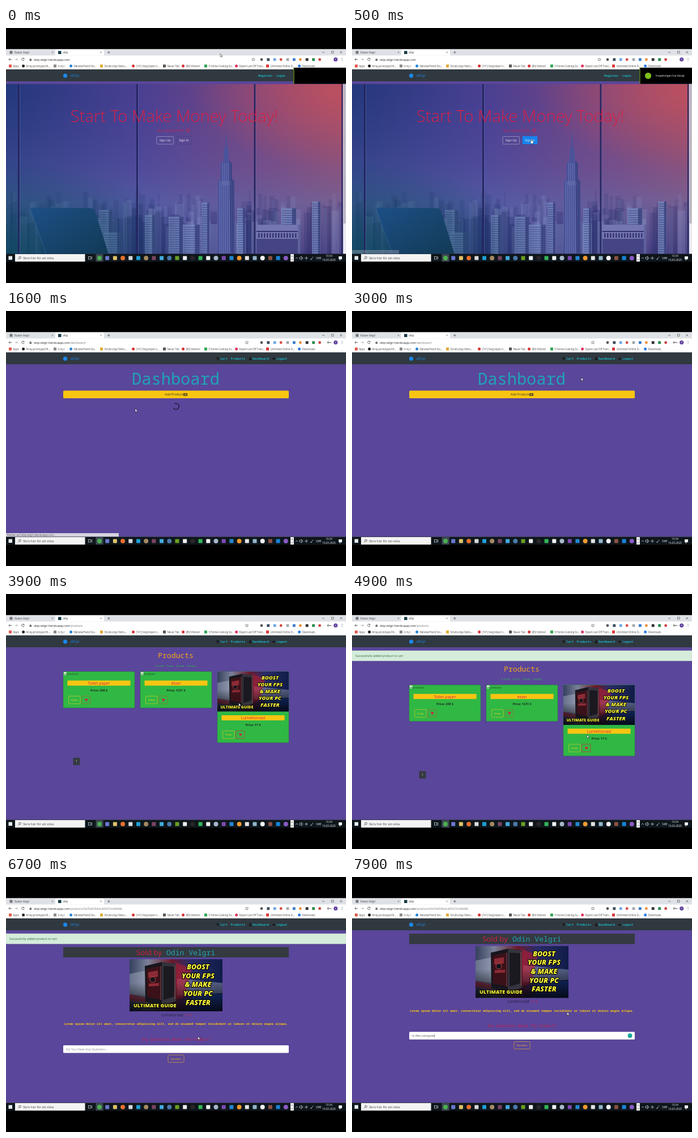
An HTML page that plays this animation: 600x450 px, repeating every 8000 ms.

```html
<!DOCTYPE html>
<html lang="sv">
<head>
<meta charset="utf-8">
<style>
html, body { margin: 0; width: 100%; height: 100%; overflow: hidden; background: #000; }
svg { display: block; width: 600px; height: 450px; font-family: "Open Sans", sans-serif; }
.mono { font-family: "Noto Sans Mono", monospace; }
.nav { font-family: "DejaVu Sans Mono", monospace; font-size: 5.35px; font-weight: bold; fill: #18b3c4; }
.mid { text-anchor: middle; }
</style>
</head>
<body>
<svg id="stage" viewBox="0 0 600 450"></svg>
<script>
const LOOP = 8000, STEP = 100, ALERT_H = 23.6;
const HOST = 'okip-velgri.herokuapp.com';
const PURPLE = '#5a469a', DARK = '#30393f', RED = '#d91f45', GOLD = '#f8c512', TEAL = '#20a4b6', GREEN = '#30b844';

const box = (x, y, w, h, fill, more = '') =>
  `<rect x="${x}" y="${y}" width="${w}" height="${h}" fill="${fill}" ${more}/>`;
const dot = (x, y, r, fill, more = '') => `<circle cx="${x}" cy="${y}" r="${r}" fill="${fill}" ${more}/>`;
const line = (d, stroke, w = 0.8) => `<path d="${d}" fill="none" stroke="${stroke}" stroke-width="${w}"/>`;
const text = (x, y, s, size, fill, more = '') =>
  `<text x="${x}" y="${y}" font-size="${size}" fill="${fill}" ${more}>${s.replace(/&/g, '&amp;')}</text>`;
const mid = (x, y, s, size, fill, more = '') => text(x, y, s, size, fill, 'text-anchor="middle" ' + more);
const group = (id, body) => `<g id="${id}">${body}</g>`;
const outline = (x, y, w, h, color) => box(x, y, w, h, 'none', `rx="1.5" stroke="${color}" stroke-width=".7"`);
const cart = (x, y, fill, k = 1) => `<g transform="translate(${x} ${y}) scale(${k})">
  <path d="M0 0h1.3l.3 1H6.5l-1 3H2.2L1.2.8H0z" fill="${fill}"/>${dot(2.6, 5.2, .7, fill)}${dot(5, 5.2, .7, fill)}</g>`;

let seed = 11;
const rnd = () => (seed = (seed * 16807) % 2147483647) / 2147483647;

const defs = `<defs>
  <linearGradient id="sky"><stop offset="0" stop-color="#23387c"/><stop offset=".4" stop-color="#4a3f92"/>
    <stop offset=".72" stop-color="#78457f"/><stop offset="1" stop-color="#a14c66"/></linearGradient>
  <linearGradient id="haze" x2="0" y2="1"><stop offset="0" stop-color="#4a4aa0" stop-opacity="0"/>
    <stop offset=".5" stop-color="#5b62ac" stop-opacity=".35"/><stop offset=".7" stop-color="#5a6cae" stop-opacity=".6"/>
    <stop offset="1" stop-color="#3c4088" stop-opacity=".85"/></linearGradient>
  <radialGradient id="deep" cx="0" cy="1" r=".55"><stop offset="0" stop-color="#0d4a5e" stop-opacity=".9"/>
    <stop offset="1" stop-color="#0d4a5e" stop-opacity="0"/></radialGradient>
  <radialGradient id="glow" cx="1" cy=".05" r=".45"><stop offset="0" stop-color="#c8525c" stop-opacity=".7"/>
    <stop offset="1" stop-color="#c8525c" stop-opacity="0"/></radialGradient>
  <linearGradient id="lid" x2="1" y2="1"><stop offset="0" stop-color="#1d4f86"/><stop offset="1" stop-color="#123a55"/></linearGradient>
  <linearGradient id="room"><stop offset="0" stop-color="#35405e"/><stop offset=".2" stop-color="#7a8198"/>
    <stop offset=".45" stop-color="#6b1a2c"/><stop offset=".65" stop-color="#2a2c66"/><stop offset="1" stop-color="#101c48"/></linearGradient>
  <linearGradient id="floor" x2="0" y2="1"><stop offset=".45" stop-color="#000" stop-opacity="0"/><stop offset="1" stop-color="#05060e" stop-opacity=".9"/></linearGradient>
  <clipPath id="view"><rect y="99" width="595" height="299.5"/></clipPath>
  <clipPath id="card"><rect width="164" height="92"/></clipPath>
</defs>`;

function city() {
  let s = '';
  for (let i = 0; i < 190; i++) {
    const near = i / 190, w = 3 + near * 9 + rnd() * 5, x = rnd() * 600, y = 283 + near * 62 + rnd() * 24 - rnd() * 20 * near;
    s += box(x.toFixed(1), y.toFixed(1), w.toFixed(1), 120, rnd() < .4 ? '#8f9fd0' : '#1d2460', `opacity="${(.1 + near * .2).toFixed(2)}"`);
  }
  const tower = (x, y, w) => {
    let t = box(x, y, w, 400 - y, '#7587bd', 'opacity=".72"') + box(x + w * .72, y, w * .28, 400 - y, '#272d6b', 'opacity=".6"');
    for (let r = y + 4; r < 398; r += 4) t += box(x + 1, r, w - 2, 1.2, '#2b3575', 'opacity=".55"');
    return t;
  };
  [[164, 321, 24], [173, 361, 32], [245, 330, 18], [287, 333, 26], [312, 347, 30], [345, 308, 14], [408, 318, 14], [486, 318, 26], [540, 306, 15]]
    .forEach(b => s += tower(...b));
  s += box(442, 347, 73, 52, '#7475b2') + box(442, 358, 73, 2, '#33336f') + box(442, 372, 73, 27, '#454585');
  for (let x = 445; x < 514; x += 5) s += box(x, 362, 2.5, 8, '#34346f');
  return s;
}

function skyscraper() {
  let s = '<path d="M388.6 185h.8l.7 24 2.3 5 1 20 5.2 5v27l4.4 5v127.5h-29V271l4.4-5v-27l5.2-5 1-20 2.3-5z" fill="#4a539a"/>';
  for (let x = 377; x < 403; x += 3.4) s += box(x, 270, 1, 128, '#8791c4', 'opacity=".6"');
  for (let x = 382; x < 398; x += 3.4) s += box(x, 238, 1, 40, '#8791c4', 'opacity=".5"');
  return s + '<path d="M394 234l4.600 5v27l4.400 5v127h-7z" fill="#252b66" opacity=".45"/>';
}

const post = (x, w) => box(x, 99, w, 300, '#22245f', 'opacity=".9"') + box(x + w, 99, 1, 300, '#7d86c0', 'opacity=".35"');

const photo = `<g clip-path="url(#view)">
  ${['sky', 'haze', 'glow'].map(g => box(0, 99, 595, 300, `url(#${g})`)).join('')}
  ${city()}${skyscraper()}${box(0, 99, 595, 300, 'url(#deep)')}
  ${post(21, 3)}${post(230, 3)}${post(437.500, 3)}${post(592, 2)}
  <path d="M43 321q0-4 5-4l101 1q6 0 8 5l24 76H70z" fill="url(#lid)"/>
  <path d="M43 321l28 78" stroke="#4a87b5" stroke-width=".7" opacity=".6"/></g>`;

const home = box(0, 94, 595, 5, PURPLE) + photo + box(595, 73, 5, 326, '#ece9f0') + box(595.5, 78, 4, 267, '#b9b3c2') +
  mid(297, 166, 'Start To Make Money Today!', 29.3, RED, 'font-weight="300"') +
  text(267, 183, 'Buy, Sell & Profit', 6.1, RED) +
  dot(321.500, 180.600, 2.700, 'none', `stroke="${RED}" stroke-width=".9"`) + line('M320 181.500q1.500 1.500 3 0', RED, .7) +
  outline(266, 191.500, 29.500, 13.500, '#a5a5c6') + mid(280.800, 200.300, 'Sign Up', 5.600, '#eee') +
  outline(301, 191.500, 26, 13.500, '#3d4386') + group('hot', box(300.700, 191, 26.600, 14, '#1685f2', 'rx="1.5"')) +
  mid(314, 200.300, 'Sign In', 5.600, '#eee');

const dash = mid(299.500, 130, 'Dashboard', 28.700, TEAL, 'class="mono"') +
  box(101, 140.500, 398, 13.500, GOLD, 'rx="1.5"') + text(280, 149.300, 'Add Product', 5.600, '#33331f') +
  box(312.800, 145.200, 7.200, 4.200, '#242424', 'rx=".5"') + dot(316.400, 147.300, 1.200, GOLD) +
  box(313.500, 146.300, .8, 2, GOLD) + box(318.400, 146.300, .8, 2, GOLD) +
  group('spin', '<path d="M-2.700 -4.700A5.400 5.400 0 1 1 -4.700 2.700" fill="none" stroke="#1b1530" stroke-width="1.300"/>');

// 164 x 92 advert picture, reused at two sizes
function advert(x, y, k) {
  const words = ['BOOST', 'YOUR FPS', '& MAKE', 'YOUR PC', 'FASTER'];
  const ink = 'font-weight="800" font-style="italic" stroke="#000" stroke-width="2" paint-order="stroke" stroke-linejoin="round"';
  return `<g transform="translate(${x} ${y}) scale(${k})" clip-path="url(#card)">
    ${box(0, 0, 164, 92, 'url(#room)')}
    <path d="M0 26L30 20v45L0 62zM84 34l80 8v18l-80 4z" fill="#c4ccdd" opacity=".35"/>
    <path d="M80 6l30 10-12 50-18 6zM0 62l30 6v9L0 73z" fill="#b51f35" opacity=".6"/>
    <path d="M112 62h52v30h-60z" fill="#1745a5" opacity=".55"/>
    ${box(0, 0, 164, 92, 'url(#floor)')}
    <path d="M27 12L57 5l25 3v66l-25 8-29-7z" fill="#17161d"/>
    <path d="M57 5l25 3v66l-25 8z" fill="#35333d"/><path d="M60 12l19 1v53l-19 6z" fill="#1b1920"/>
    <path d="M30 17l24-5v59l-23-4z" fill="#3b1119"/><path d="M33 23l17-3v11l-17 2zM34 43l18-1v5l-18 1z" fill="#8d2b35"/>
    ${dot(41, 36, 5, '#15131b', 'stroke="#c44b4d"')}${line('M55 12v60M80 11v59', '#a54a50', 1)}
    ${words.map((w, i) => mid(121, 18 + i * 15.700, w, 12.400, '#f6f23a', ink)).join('')}
    ${text(7, 84.500, 'ULTIMATE GUIDE', 9, '#f6f23a', ink.replace('italic', 'normal'))}</g>`;
}

function card(x, name, price, picture) {
  const dy = picture ? 61.300 : 0;
  return box(x, 160.500, 126, 64 + dy, GREEN, 'rx="1.500" stroke="#27813c" stroke-width=".6"') +
    (picture ? advert(x, 160.500, .768)
      : box(x + 1, 161.500, 4.500, 5, '#e8efe8') + box(x + 1.800, 164, 3, 1.800, '#4c9a52') + text(x + 6, 166.700, 'product', 5.600, '#25452c')) +
    box(x + 7.500, 176.300 + dy, 111, 9, GOLD) + mid(x + 63, 183.500 + dy, name, 7.200, RED) +
    mid(x + 63, 195.700 + dy, price, 5.400, '#1d2b20', 'font-weight="700"') +
    outline(x + 9.500, 203.800 + dy, 20.500, 13.500, '#d4c924') + mid(x + 19.700, 212.500 + dy, 'View', 5.400, '#d4c924') +
    outline(x + 32.500, 203.800 + dy, 15.500, 13.500, picture ? RED : '#9d6a38') + cart(x + 37, 207.600 + dy, RED);
}

// Pages that slide with the alerts are laid out for none showing.
const shop = `<g transform="translate(0 ${-ALERT_H})">` + mid(299.500, 137, 'Products', 13.100, '#f3a51e', 'class="mono"') +
  mid(300, 152.200, 'Find Your Item Today', 6, '#2fae55', 'class="mono"') +
  card(101, 'Toilet paper', 'Price: 200 $') + card(237, 'eban', 'Price: 1231 $') + card(373, 'LumeKorvad', 'Price: 17 $', true) +
  box(118.500, 312.500, 12, 13, '#343a40', 'rx="1"') + mid(124.500, 321, '1', 5.400, '#ddd') + '</g>';

const item = box(101, 100, 398, 18.300, '#343a40') + text(230, 114, 'Sold by', 13.300, RED) +
  text(283, 114, 'Odin Velgri', 13.100, TEAL, 'class="mono"') + advert(218, 121.500, 1) +
  text(274, 222, 'LumeKorvad', 6.500, '#272142') + text(315, 222, '17 $', 6, RED) +
  mid(300, 237.600, 'Lorem ipsum dolor sit amet, consectetur adipiscing elit, sed do eiusmod tempor incididunt ut labore et dolore magna aliqua.',
    5.360, GOLD, 'class="mono" font-weight="700"') +
  mid(300, 265, 'Any Questions About The Product?', 6.300, '#c02350', 'class="mono"') +
  box(101, 273.300, 398, 13.500, '#fff', 'rx="1.500"') + '<text id="typed" x="106" y="282.300" font-size="5.500"/>' +
  group('caret', box(0, 277, .5, 6, '#333')) + group('helper', dot(490.500, 280, 3.900, '#18a79c')) +
  outline(286, 290.500, 28, 13, '#d8a72b') + mid(300, 299, 'Senden', 5.500, '#d8a72b');

const navbar = box(0, 73, 600, 21, DARK) + dot(104.500, 84.200, 3.600, '#1d87ec') +
  text(113, 86.300, 'oKip', 6.600, '#1d87ec', 'class="mono" font-style="italic"') +
  group('guest', '<text class="nav" x="445" y="86">Register</text><text class="nav" x="477" y="86">Login</text>') +
  group('member', cart(370.500, 81.500, '#14181b', .85) +
    [['Cart', 378], ['Products', 396.500], ['Dashboard', 435], ['Logout', 477]].map(([s, x]) => `<text class="nav" x="${x}" y="86">${s}</text>`).join('') +
    dot(431, 82.700, 1.400, '#14181b') + box(428.600, 84.300, 4.800, 2.400, '#14181b', 'rx="1.200"') +
    '<path d="M469.500 83.200h3v-1.500l2.700 2.500-2.700 2.500v-1.500h-3z" fill="#14181b"/>');

function browser() {
  const marks = [[5, 'Apps', '#e0564a'], [28, 'Array.prototype.filt...', '#222'], [84, 'it my i', '#888'], [112, 'Nätsida/Hand Sto...', '#2684d9'],
    [166, 'Strukturtyp Nätru...', '#e0a92e'], [222, '(141) Varg köper n...', '#d93030'], [277, 'Neuer Tab', '#555'], [310, '(85) Vidonel', '#d93030'],
    [350, '5 Home-Cooking So...', '#32a552'], [404, 'Expert-Led Off Train...', '#e2335f'], [459, 'Unlimited Online D...', '#d33'], [515, 'Downloads', '#2f7de0']];
  const tools = ['#555', '#3d4a5c', '#6fa8e8', '#d84a42', '#a5a7ac', '#3d7bd0', '#e88b30', '#333', '#278a4b', '#c83f38'];
  const gray = '#5f6368';
  return box(0, 37.500, 600, 361, '#fff') + box(0, 37.500, 600, 11, '#dee1e6') + '<path d="M87 48.500V40q0-2 2-2h82q2 0 2 2v8.500z" fill="#fff"/>' +
    box(6.500, 40.500, 5, 5, '#777') + text(15, 45, 'Ruben Velgri', 4.500, '#444') + box(92, 40.500, 5.500, 5.500, '#173b46') + text(100, 45, 'oKip', 4.500, '#333') +
    [82, 167.500].map(x => line(`M${x - 1.400} 41.600l2.800 2.800m0 -2.800l-2.800 2.800`, gray, .6)).join('') +
    line('M179 43h4.600M181.300 40.700v4.600M558 43h4M589.500 41l3.600 3.600m0 -3.600l-3.600 3.600', '#444', .7) + box(574.500, 41, 3.600, 3.600, 'none', 'stroke="#444" stroke-width=".6"') +
    line('M10 55.500H5m2.200 -2.200L5 55.500l2.200 2.200M31.700 53.800a2.300 2.300 0 1 0 .5 2.200m-.3 -3v1.500h-1.600', '#444') + line('M15.500 55.500h5m-2.200 -2.200l2.200 2.200-2.200 2.200', '#aaa') +
    box(41.500, 55, 3.600, 2.800, gray) + line('M42.300 55v-1q1-1.500 2 0v1', gray, .6) +
    '<text id="url" x="49" y="57.600" font-size="5.100" fill="#222"/>' +
    group('star', '<path d="M0-2.700l.8 1.800 2 .2-1.500 1.300.5 2-1.800-1-1.800 1 .5-2-1.500-1.300 2-.2z" fill="none" stroke="#555" stroke-width=".6"/>') +
    tools.map((c, i) => i % 3 ? box(449 + i * 11.400, 53.300, 4.800, 4.800, c) : dot(451 + i * 11.400, 55.700, 2.400, c)).join('') +
    group('key', dot(568.500, 55.500, 1.300, 'none', 'stroke="#444"') + line('M570 55.500h3.500v1.300', '#444')) +
    dot(581.700, 55.500, 3.500, '#5b3a9a') + mid(581.700, 57.200, 'R', 4, '#fff') + [53.400, 55.500, 57.600].map(y => dot(593, y, .6, gray)).join('') +
    marks.map(([x, s, c], i) => (i % 2 ? dot(x + 2.600, 67, 2.500, c) : box(x, 64.500, 5, 5, c)) + text(x + 7.500, 68.700, s, 4.450, '#444')).join('');
}

function taskbar() {
  const apps = '#4caf50 #6a78d0 #dfc26b #e5702d #dadada #1e9fd5 #a58a62 #7a4460 #44aadd #4c79a8 #6a9f22 #efefef #2b2528 #36b458 #f1f1f1 #a8b8ca #7c4bb0 #2487cf #f09a30 #e4e4e4 #93b6ca #f3f3f3 #8a5142 #1684d6 #8a5ac2'.split(' ');
  return box(0, 398.500, 600, 14, '#0e161c') + box(4.500, 402.500, 6.500, 6.500, '#e9eef2') + box(16, 399, 123.500, 13.200, '#f3f3f3') +
    dot(24.500, 405, 1.900, 'none', 'stroke="#333" stroke-width=".7"') + line('M23 406.500l-2 2', '#333', .7) + text(30, 407.800, 'Skriv här för att söka', 5.650, '#444') +
    box(145.500, 403.500, 4, 4.500, 'none', 'stroke="#ddd" stroke-width=".7"') + box(151, 403, .8, 5.500, '#ddd') +
    box(158.500, 399, 13, 13.200, '#3c4a52') +
    apps.map((c, i) => { const x = 165 + i * 13.700; return i % 3 ? box(x - 3.500, 402.500, 7, 7, c, 'rx=".8"') : dot(x, 406, 4, c); }).join('') +
    box(502, 399, 6, 13.200, '#eee') + line('M503.500 403.500l1.500-1.500 1.500 1.500m0 4.500l-1.500 1.500-1.500-1.500', '#444', .7) +
    line('M511 407l2-2 2 2M518 404.500v3h1.500l2 1.500v-6l-2 1.500zM523 404q1.500 2 0 4M527 406h6m-3 -3v6M538 408.500l4.500-5M537 408h3', '#ddd', .7) +
    text(547, 407.800, 'SWE', 4.800, '#eee') + mid(570, 404.300, '10:34', 4.600, '#eee') + mid(570, 410.800, '16.03.2020', 4.600, '#eee') +
    box(587, 403, 6, 5, '#eee') + line('M589 408v2l2-2', '#eee') ;
}

const alertRow = i => group('alert' + i, box(0, 100 + i * ALERT_H, 600, 18, '#d6ecdb', 'stroke="#b9d9c4" stroke-width=".5"') +
  text(6, 111 + i * ALERT_H, 'Successfully added product to cart', 5.250, '#24663a'));

const toast = box(507.500, 70, 92.500, 28.500, '#000') + box(507.500, 70, 1, 28.500, '#86bd22') +
  group('note', dot(522.500, 84.300, 5.600, '#7fbd1d') + text(536, 86.300, 'Inspelningen har börjat', 4.700, '#eee'));

document.getElementById('stage').innerHTML = defs + box(0, 0, 600, 450, '#000') + browser() + box(0, 73, 600, 325.500, PURPLE) +
  group('home', home) + group('dash', dash) + group('shop', shop) + group('item', item) + navbar + alertRow(0) + alertRow(1) +
  group('status', '<rect id="plate" y="392" height="6.500" fill="#d5d2df"/><text id="hint" x="1.500" y="397" font-size="4.600" fill="#555"/>') +
  group('toast', toast) + taskbar() +
  group('mouse', group('arrow', '<path d="M0 0v5.700l1.400-1.200.9 2 1-.4-.9-2h1.900z" fill="#fff" stroke="#111" stroke-width=".5"/>') +
    group('hand', '<path d="M-.5-2q1-1 1.500 0v3l2.700.6q.8.3.6 1.500L3.600 6H.3L-2 2.800q0-1 1-.5l.5.500z" fill="#fff" stroke="#111" stroke-width=".5"/>'));

const $ = id => document.getElementById(id);
const show = (id, on) => $(id).setAttribute('display', on ? 'inline' : 'none');
const move = (id, x, y, more = '') => $(id).setAttribute('transform', `translate(${x} ${y}) ${more}`);
const at = (table, t) => table.filter(r => r[0] <= t).pop();

const pages = [[0, 'home', ''], [1000, 'login', '/login'], [1500, 'dash', '/dashboard'], [3400, 'shop', '/products'], [5500, 'item', '/products/5e35d43bbfca09233c4d6d8c']];
const alerts = [[0, 0], [4500, 1], [5100, 2], [6500, 1], [6800, 0]];
const typing = [[0, ''], [7200, 'Is'], [7300, 'Is t'], [7400, 'Is thi'], [7500, 'Is this co'], [7600, 'Is this compu'], [7800, 'Is this comput'], [7900, 'Is this compute']];
const hints = [[0, '', 0], [500, `https://${HOST}/login`, 83], [1000, '', 0], [1500, `Warten auf ${HOST}...`, 199], [2000, '', 0],
  [3300, `https://${HOST}/products`, 95], [3600, '', 0], [5300, `https://${HOST}${pages[4][2]}`, 199], [6500, '', 0]];
const route = [[0, 378, 45], [500, 316, 198], [900, 316, 198], [1400, 228, 172.500], [2600, 228, 172.500], [3000, 404.500, 117.500], [3200, 409, 84], [3400, 409, 84],
  [4300, 412, 270], [4600, 412, 270], [4900, 414.500, 248.500], [5000, 412, 270], [5200, 393, 271], [5600, 393, 271], [6000, 399, 292.500], [6900, 330, 280], [7200, 379.500, 238.500], [8000, 379.500, 238.500]];

function pointer(t) {
  const i = Math.max(1, route.findIndex(r => r[0] > t)), [t0, x0, y0] = route[i - 1], [t1, x1, y1] = route[i];
  const p = (t - t0) / (t1 - t0), e = p * p * (3 - 2 * p);
  return [x0 + (x1 - x0) * e, y0 + (y1 - y0) * e];
}

function draw(t) {
  const [, page, path] = at(pages, t), count = at(alerts, t)[1], word = at(typing, t)[1], [, hint, width] = at(hints, t);
  ['home', 'dash', 'shop', 'item'].forEach(id => show(id, id === page));
  const inside = t >= 1500;
  show('guest', !inside); show('member', inside);
  show('key', page !== 'home'); move('star', page === 'home' ? 436.500 : 425, 55.500);
  $('url').innerHTML = `${HOST}<tspan fill="#777">${path}</tspan>`;

  show('hot', t >= 400 && t < 1000);
  show('toast', t < 1400); show('note', t >= 300);
  show('spin', t < 2200); move('spin', 300, 168.500, `rotate(${(t - 1600) * .48})`);
  show('alert0', count > 0); show('alert1', count > 1);
  move('shop', 0, count * ALERT_H); move('item', 0, count * ALERT_H);

  $('typed').textContent = word || 'Do You Have Any Question...';
  $('typed').setAttribute('fill', word ? '#495057' : '#80868b');
  show('caret', word); show('helper', t >= 7000);
  if (word) move('caret', 106.400 + $('typed').getComputedTextLength(), 0);

  show('status', hint); $('hint').textContent = hint; $('plate').setAttribute('width', width);
  $('status').setAttribute('opacity', t < 1000 ? .35 : 1);

  const hand = (t >= 400 && t < 1000) || (t >= 3100 && t < 3500) || (t >= 4200 && t < 4700) || (t >= 5000 && t < 5500);
  show('arrow', !hand); show('hand', hand); move('mouse', ...pointer(t));
}

const start = performance.now();
function tick(now) {
  draw(Math.floor((Math.max(0, now - start) % LOOP) / STEP) * STEP);
  requestAnimationFrame(tick);
}
draw(0);
requestAnimationFrame(tick);
</script>
</body>
</html>
```
